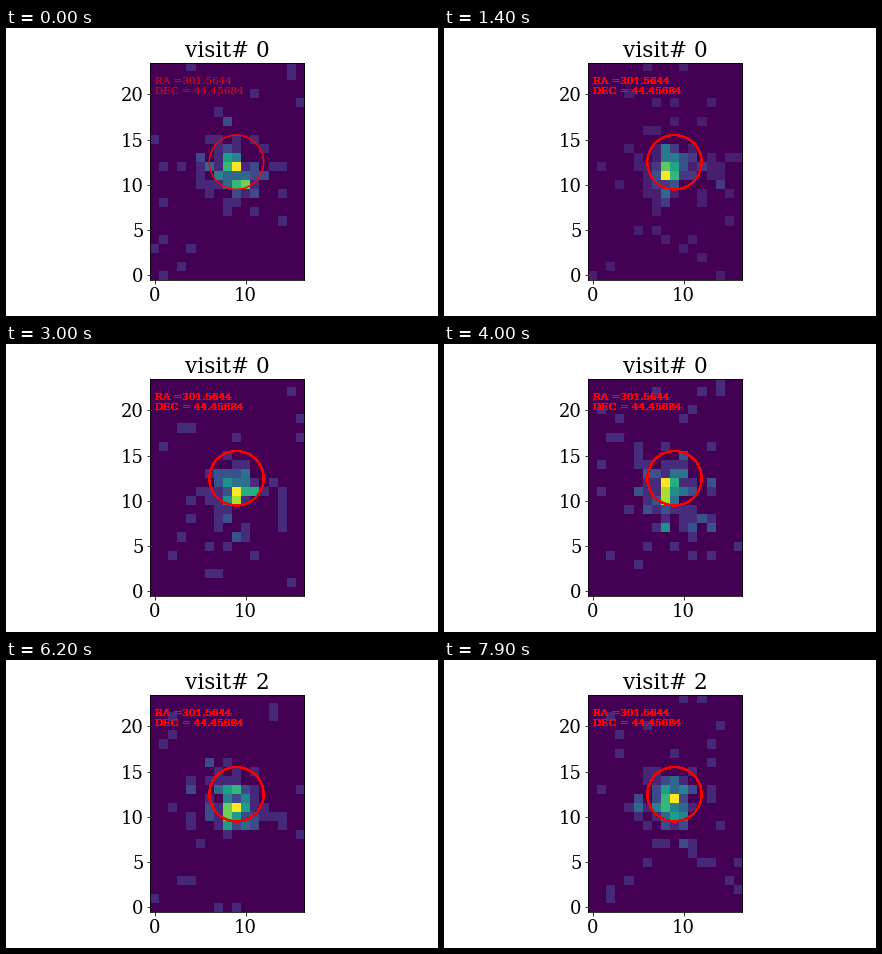
A matplotlib script for the animation above (8 s loop, 432x288 px).

```python
import matplotlib.pyplot as plt
import numpy as np
from matplotlib.animation import FuncAnimation
from matplotlib.patches import Circle

FRAMES, INTERVAL = 80, 100
COLS, ROWS = 17, 24
RA, DEC = "301.5644", "44.45684"
VISIT_STARTS = (48, 59)
MAX_OVERLAYS = 50  # repeated strokes are saturated beyond this

plt.rcParams.update({
    "font.family": "DejaVu Serif",
    "font.size": 18,
    "figure.subplot.bottom": 0.125,
})


def gauss(x, y, cx, cy, sx, sy):
    return np.exp(-((x - cx) / sx) ** 2 / 2 - ((y - cy) / sy) ** 2 / 2)


def photon_counts(seed=12):
    """Poisson photon counts of a star over a faint background."""
    rng = np.random.default_rng(seed)
    y, x = np.mgrid[:ROWS, :COLS]
    rate = (0.055
            + 5.4 * gauss(x, y, 8.7, 11.3, 1.15, 1.35)
            + 0.75 * gauss(x, y, 9.3, 10.8, 2.5, 2.7))
    return rng.poisson(rate, (FRAMES, ROWS, COLS))


counts = photon_counts()
fig, ax = plt.subplots(figsize=(6, 4), dpi=72)
image = ax.imshow(counts[0], cmap="viridis", origin="lower",
                  interpolation="nearest")
ax.set_xticks([0, 10])
ax.set_yticks(range(0, 21, 5))
title = ax.set_title("visit# 0")


def add_overlay():
    ring = Circle((9, 12.5), 3, fill=False, ec="red", lw=1.5)
    return (ax.add_patch(ring),
            ax.text(0, 21.1, f"RA ={RA}", color="red", size="xx-small"),
            ax.text(0, 20, f"DEC = {DEC}", color="red", size="xx-small"))


overlays = [add_overlay() for _ in range(MAX_OVERLAYS)]


def update(k):
    image.set_data(counts[k])
    image.set_clim(0, counts[k].max())
    title.set_text(f"visit# {sum(k >= s for s in VISIT_STARTS)}")
    # each exposure draws its marker on top of the earlier ones
    for i, group in enumerate(overlays):
        for artist in group:
            artist.set_visible(i <= k)
    return image, title


anim = FuncAnimation(fig, update, frames=FRAMES, interval=INTERVAL,
                     repeat=True, repeat_delay=0, blit=False)
plt.show()
```
